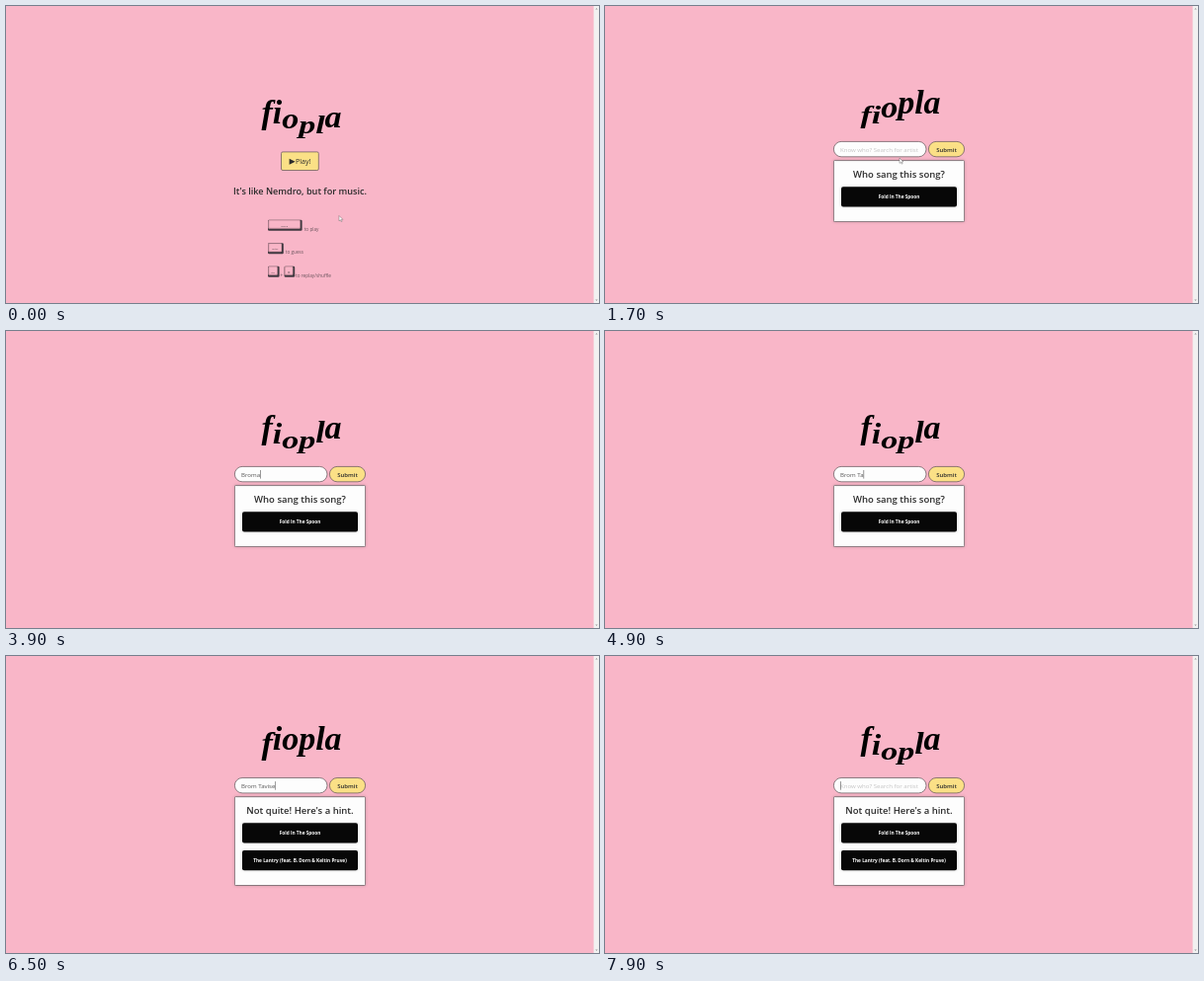
Recreate the animation shown at these times as an HTML page. Size 600 by 301 pixels, loop 8 s.

```html
<!DOCTYPE html>
<html lang="en">
<head>
<meta charset="utf-8">
<title>Guess the song</title>
<style>
  html, body { margin: 0; width: 100%; height: 100%; overflow: hidden; background: #f9b6c8; }
  svg { display: block; width: 100vw; height: 100vh; font-family: "Open Sans", "Noto Sans", sans-serif; fill: #2b2b2b; }
  .mid { text-anchor: middle; }
  .logo { font: italic bold 34px "Liberation Serif", serif; fill: #000; }
  .box { stroke: #5d5257; stroke-width: .7; }
  .yellow { fill: #fbe086; }
  .white { fill: #fdfdfd; }
  .head { font-size: 9.5px; font-weight: 600; }
  .song { font-size: 4.75px; font-weight: 700; fill: #fff; }
  .tile { fill: #070707; }
  .hint { font-size: 4.7px; fill: #6b565e; }
  .cap { font-size: 2.5px; fill: #4a3d42; }
  .field { font-size: 6.1px; fill: #555; }
  .shadow { filter: drop-shadow(0 .8px 1.5px #0003); }
</style>
</head>
<body>
<svg viewBox="0 0 600 301" preserveAspectRatio="none">
  <rect width="600" height="301" fill="#f9b6c8"/>
  <rect x="594.6" width="5.4" height="301" fill="#f2f1f1"/>
  <path d="M596.3 3.4l1.2-1.4 1.2 1.4zM596.3 297.6l1.2 1.4 1.2-1.4z" fill="#999"/>
  <g id="logo" class="logo"></g>

  <g id="start">
    <rect class="box yellow" x="278.5" y="147.9" width="37.8" height="18.6" rx="1.5"/>
    <path d="M286.6 154.7l6 3-6 3z"/>
    <text x="293" y="160.2" font-size="7">Play!</text>
    <text class="mid" x="297.5" y="191.3" font-size="9.15" font-weight="600">It's like Nemdro, but for music.</text>
    <g id="keys"></g>
    <text class="hint" x="301.7" y="228">to play</text>
    <text class="hint" x="282.8" y="251.4">to guess</text>
    <text class="hint" x="277.6" y="274.8">+</text>
    <text class="hint" x="293" y="274.8">to replay/shuffle</text>
  </g>

  <g id="game">
    <rect class="box white" x="231.4" y="137.4" width="93.6" height="15.4" rx="7.7"/>
    <text id="field" class="field" x="238" y="148.2"></text>
    <rect id="caret" y="141" width=".6" height="8.6" fill="#555"/>
    <rect class="box yellow" x="327.4" y="137.4" width="36.2" height="15.4" rx="7.7"/>
    <text class="mid" x="345.5" y="147.7" font-size="6" font-weight="600">Submit</text>
    <rect id="panel" class="box white shadow" x="231.4" y="156.6" width="132.2" height="62" rx="1"/>
    <text id="head" class="head mid" x="297.5" y="174.2"></text>
    <rect class="tile shadow" x="239" y="183.2" width="117" height="20.2" rx="2"/>
    <text class="song mid" x="297.5" y="195.1">Fold In The Spoon</text>
    <g id="second">
      <rect class="tile shadow" x="239" y="211" width="117" height="20.2" rx="2"/>
      <text class="song mid" x="297.5" y="222.9">The Lantry (feat. B. Dorn &amp; Keltin Pruve)</text>
    </g>
  </g>

  <path id="cursor" d="M0 0v5.4l1.3-1.2.9 1.9.9-.4-.9-1.8h1.7z" fill="#fff" stroke="#555" stroke-width=".4"/>
</svg>
<script>
const LOOP = 8000, STEP = 100, GAME = 1500, HINT = 5500;
const $ = id => document.getElementById(id);
const show = (id, on) => $(id).setAttribute('visibility', on ? 'inherit' : 'hidden');
const move = (node, x, y, extra = '') => node.setAttribute('transform', `translate(${x} ${y})${extra}`);
const clamp = v => Math.min(1, Math.max(0, v));
const smooth = v => (v = clamp(v)) * v * (3 - 2 * v);

// Keyboard hints: face, dark lower-right edge, label
const key = (x, y, w, label) => `
  <rect x="${x}" y="${y}" width="${w}" height="11" rx="1.2" fill="#403940"/>
  <rect x="${x + .3}" y="${y + .3}" width="${w - 2.1}" height="8.7" rx="1" fill="#d598a8"/>
  <rect x="${x + 1.4}" y="${y + 1}" width="${w - 4}" height="7" rx=".8" fill="#f9b6c8"/>
  <text class="cap mid" x="${x + w / 2 - .6}" y="${y + 7.2}">${label}</text>`;
$('keys').innerHTML = key(265, 216.8, 34.6, 'space') + key(265, 240.2, 15.8, 'enter') +
  key(265, 263.8, 11.6, 'ctrl') + key(281.6, 263.8, 10.6, '⌘');

$('logo').innerHTML = [...'fiopla'].map(c => `<text>${c}</text>`).join('');
const letters = [...$('logo').children];
const widths = letters.map(l => l.getComputedTextLength());
const total = widths.reduce((a, b) => a + b);

// Each letter dips and squashes once a second, 100 ms after its neighbour
function drawLogo(t, base) {
  let x = 299 - total / 2;
  letters.forEach((letter, i) => {
    const phase = (t - 660 - i * 100 + 10500) % 1000 - 500;
    const dip = Math.abs(phase) < 260 ? Math.cos(phase / 260 * Math.PI / 2) ** 2 : 0;
    move(letter, x, base + 11 * dip, ` scale(1 ${1 - .3 * dip})`);
    x += widths[i];
  });
}

const firstTry = 'Broma', answer = 'Brom Tavise';
function typed(t) {
  if (t < 4500) return firstTry.slice(0, Math.max(0, Math.floor((t - 3300) / 120) + 1));
  if (t < 6900) return answer.slice(0, 4 + Math.floor((t - 4500) / 114));
  return answer.slice(0, Math.max(0, 11 - Math.floor((t - 6800) / 100)));
}

function draw(t) {
  const playing = t >= GAME, hinted = t >= HINT;
  drawLogo(t, hinted ? 95 : playing ? 109 : 119);
  show('start', !playing);
  show('game', playing);
  show('second', hinted);
  move($('game'), 0, hinted ? -13.9 : 0);
  $('panel').setAttribute('height', hinted ? 89.8 : 62);
  $('head').textContent = hinted ? "Not quite! Here's a hint." : 'Who sang this song?';

  const slide = 2 * clamp((6100 - t) / 600);
  move($('second'), slide, slide * .7);

  const text = typed(t), field = $('field');
  field.textContent = text || 'Know who? Search for artist';
  field.style.fill = text ? '#555' : '#c4c4c4';
  $('caret').setAttribute('x', 238 + (text ? field.getComputedTextLength() : 0));
  show('caret', playing && (t % 1060 < 530 || t >= 3300 && t < 5300));

  const go = smooth((t - 600) / 600);
  move($('cursor'), 337 - 39 * go, 212.5 - 58.5 * go);
  show('cursor', t < 2400);
}

function tick() {
  draw(Math.floor(performance.now() % LOOP / STEP) * STEP);
  requestAnimationFrame(tick);
}
tick();
</script>
</body>
</html>
```
